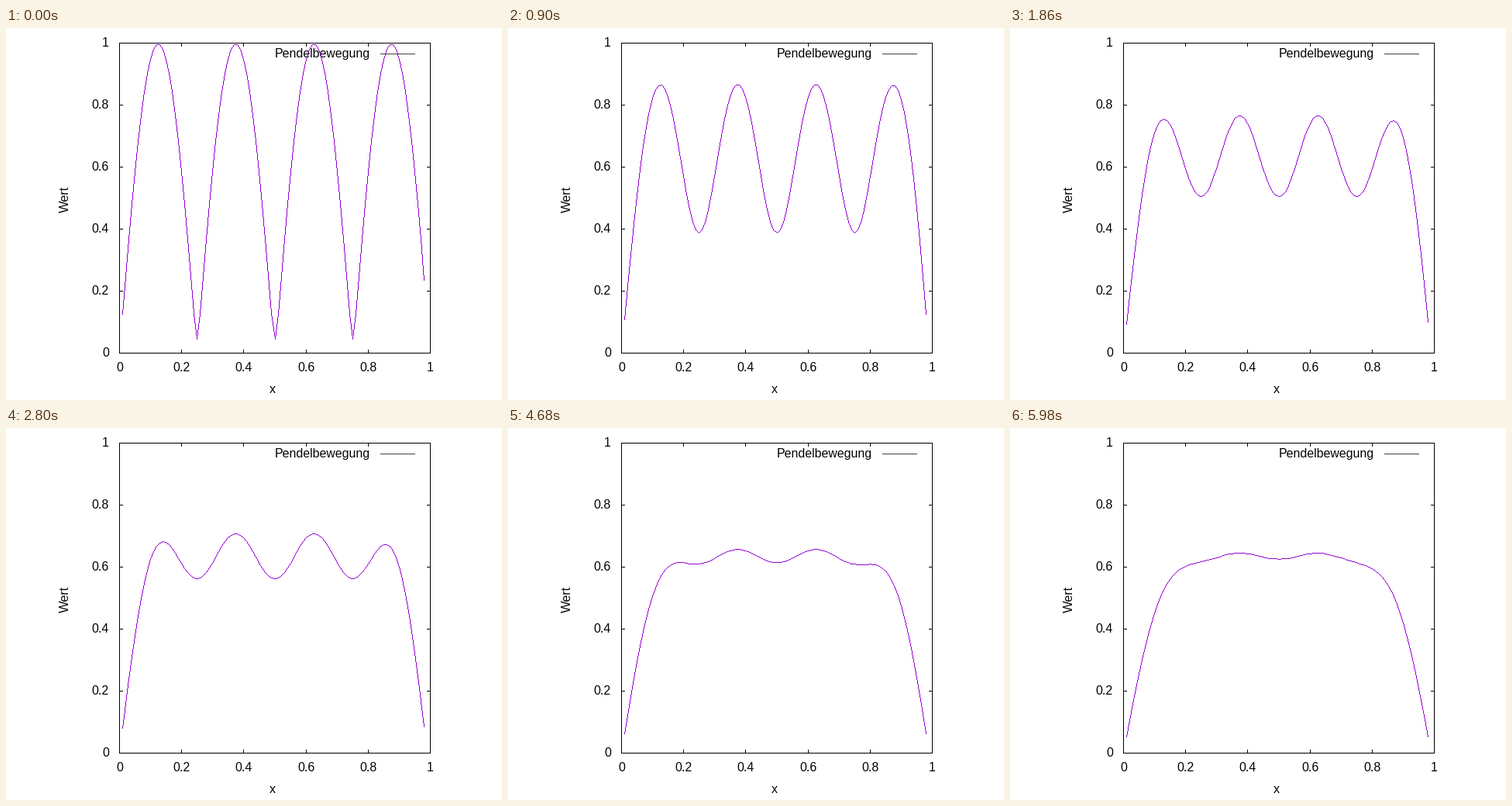
These frames come from a looping animation (640x480 px, 6 s). A matplotlib script:

```python
import numpy as np
import matplotlib.pyplot as plt
from matplotlib.animation import FuncAnimation
from matplotlib.patches import PathPatch, Rectangle
from matplotlib.path import Path

W, H, DPI = 640, 480, 100
FRAMES, INTERVAL = 300, 20
LEFT, RIGHT, TOP, BOTTOM = 146, 547, 19, 419
TIC = 4
PURPLE, KEY_GREY = "#9400d3", "#404040"

plt.rcParams.update({
    "font.family": "Liberation Sans",
    "font.size": 16 * 72 / DPI,
    "text.hinting": "default",
    "toolbar": "None",
})


def diffuse(u, rate=0.1):
    """One explicit heat-equation step with both ends held at zero."""
    new = np.zeros_like(u)
    new[1:-1] = u[1:-1] + rate * (u[2:] - 2 * u[1:-1] + u[:-2])
    return new


def simulate():
    u = np.abs(np.sin(4 * np.pi * np.arange(100) / 100))
    states = []
    for _ in range(FRAMES):
        u = diffuse(diffuse(u))
        states.append(u[1:-1])
    return states


def trace(px, py):
    """Pixels of a one-pixel polyline through whole-pixel points."""
    xs, ys = [], []
    for x0, y0, x1, y1 in zip(px[:-1], py[:-1], px[1:], py[1:]):
        n = int(max(abs(x1 - x0), abs(y1 - y0), 1))
        t = np.arange(n + 1) / n
        xs.append(np.floor(x0 + (x1 - x0) * t + 0.5))
        ys.append(np.floor(y0 + (y1 - y0) * t + 0.5))
    return np.concatenate(xs), np.concatenate(ys)


CORNERS = np.array([[0, 0], [1, 0], [1, 1], [0, 1], [0, 0]])
CODES = [Path.MOVETO] + [Path.LINETO] * 3 + [Path.CLOSEPOLY]


def curve_path(values):
    px = np.floor(LEFT + (RIGHT - LEFT) * np.arange(1, 99) / 100 + 0.5)
    py = BOTTOM - np.floor((BOTTOM - TOP) * values + 0.5)
    cells = np.stack(trace(px, py), axis=1)
    verts = (cells[:, None, :] + CORNERS).reshape(-1, 2)
    return Path(verts, np.tile(CODES, len(cells)))


fig = plt.figure(figsize=(W / DPI, H / DPI), dpi=DPI, facecolor="white")
ax = fig.add_axes([0, 0, 1, 1])
ax.set_xlim(0, W)
ax.set_ylim(H, 0)
ax.axis("off")


def bar(x0, y0, x1, y1, color="black"):
    """Solid bar covering the pixels x0..x1, y0..y1."""
    ax.add_patch(Rectangle((x0, y0), x1 - x0 + 1, y1 - y0 + 1,
                           facecolor=color, linewidth=0, antialiased=False))


def label(x, y, text, **kw):
    ax.text(x, y, text, ha="left", va="baseline", color="black", **kw)


for y in (TOP, BOTTOM):
    bar(LEFT, y, RIGHT, y)
for x in (LEFT, RIGHT):
    bar(x, TOP, x, BOTTOM)

for k in range(6):
    x = round(LEFT + (RIGHT - LEFT) * k / 5)
    y = BOTTOM - (BOTTOM - TOP) * k // 5
    bar(x, TOP, x, TOP + TIC)
    bar(x, BOTTOM - TIC, x, BOTTOM)
    bar(LEFT, y, LEFT + TIC, y)
    bar(RIGHT - TIC, y, RIGHT, y)
    text = f"{k / 5:g}"
    short = len(text) == 1
    label(x - (4 if short else 11), 443, text)
    label(124 if short else 110, y + 5, text)

label(340, 471, "x")
label(81, 238, "Wert", rotation=90, rotation_mode="anchor")
label(347, 38, "Pendelbewegung")
bar(483, 33, 527, 33, KEY_GREY)

states = simulate()
curve = PathPatch(curve_path(states[0]), facecolor=PURPLE, linewidth=0,
                  antialiased=False, snap=False, zorder=5)
ax.add_patch(curve)


def update(i):
    curve.set_path(curve_path(states[i]))
    return [curve]


anim = FuncAnimation(fig, update, frames=FRAMES, interval=INTERVAL,
                     repeat=True, repeat_delay=0, blit=False)
plt.show()
```
